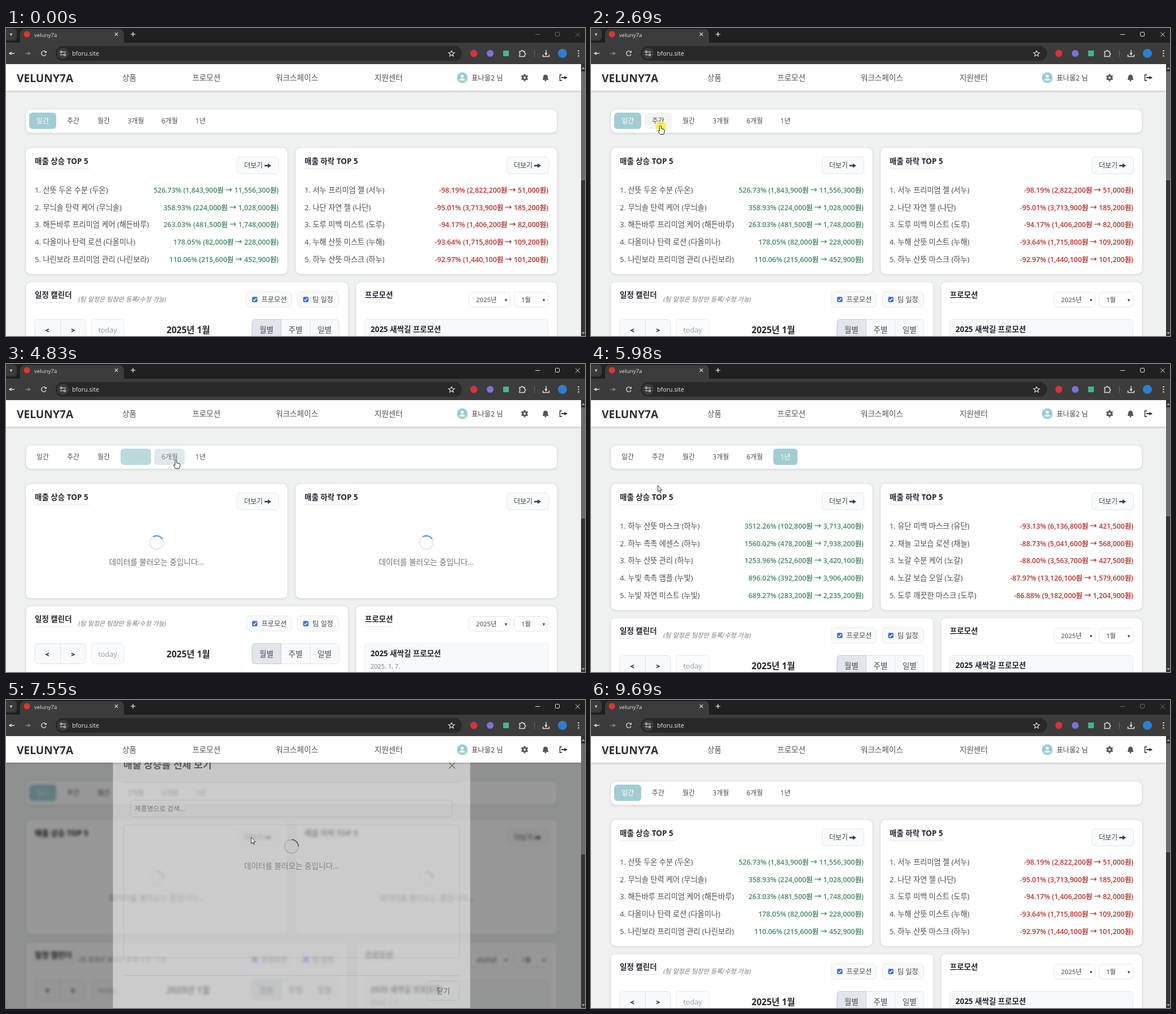
Recreate the animation shown at these times as an HTML page with a canvas. Size 1026 by 546 pixels, loop 9820 ms.

```html
<!DOCTYPE html>
<html lang="ko">
<head>
<meta charset="utf-8">
<title>veluny7a</title>
<style>
html,body{margin:0;width:100%;height:100%;overflow:hidden;background:#eff1f1}
canvas{display:block}
</style>
</head>
<body>
<canvas id="stage" width="1026" height="546"></canvas>
<script>
const cv = document.getElementById('stage');
const main = cv.getContext('2d');
const layer = new OffscreenCanvas(cv.width, cv.height).getContext('2d');
let c = main;
const LOOP = 9820, STEP = 142.9, LOAD = 450, FADE = 250;
const FONT = '"Open Sans","Noto Sans CJK KR","Noto Sans CJK",sans-serif';
const clamp = v => Math.max(0, Math.min(1, v));

// Sales rows: brand|product|before|after, the change is computed
const DAY = {
  up: ['두온|산뜻 # 수분|1843900|11556300', '무늬솔|# 탄력 케어|224000|1028000',
    '해든바루|# 프리미엄 케어|481500|1748000', '다올미나|# 탄력 로션|82000|228000',
    '나린보라|# 프리미엄 관리|215600|452900'],
  down: ['서누|# 프리미엄 젤|2822200|51000', '나단|# 자연 젤|3713900|185200',
    '도루|# 미백 미스트|1406200|82000', '누해|# 산뜻 미스트|1715800|109200',
    '하누|# 산뜻 마스크|1440100|101200']
};
const YEAR = {
  up: ['하누|# 산뜻 마스크|102800|3713400', '하누|# 촉촉 에센스|478200|7938200',
    '하누|# 산뜻 관리|252600|3420100', '누빛|# 촉촉 앰플|392200|3906400',
    '누빛|# 자연 미스트|283200|2235200'],
  down: ['유단|# 미백 마스크|6136800|421500', '채늘|# 고보습 로션|5041600|568000',
    '노갈|# 수분 케어|3563700|427500', '노갈|# 보습 오일|13126100|1579600',
    '도루|# 깨끗한 마스크|9182000|1204900']
};

let tabX = 35;
const TABS = ['일간', '주간', '월간', '3개월', '6개월', '1년'].map(s => {
  const w = 26 + 11 * s.length - (/\d/.test(s) ? 5 : 0), x = tabX + 6;
  tabX = x + w;
  return { s, x, w };
});
const PICKS = [-LOOP, 2720, 3418, 4150, 4788, 5370, 6600]; // each pick takes the next tab
const OPEN = 7418, CLOSE = 9270;
const LOADS = [...PICKS.slice(1), OPEN];
const CLICKS = [...LOADS, CLOSE];

// Pointer moves: leave step, arrive step, x, y
const MOVES = [[0, 1, 983, 470], [1, 4, 976, 412], [5, 13, 477, 203], [13, 18, 123, 173], [21, 25, 190, 169],
  [27, 29, 236, 170], [30, 33, 301, 170], [34, 37, 345, 171], [38, 42, 118, 215], [42, 45, 32, 176],
  [45, 47, 70, 172], [48, 52, 434, 243], [53, 57, 488, 283], [59, 61, 675, 364], [62, 65, 774, 514]];

function pointer(n) {
  if (n < 1 || n > 67) return null;
  let [, , x, y] = MOVES[0];
  for (const [from, to, tx, ty] of MOVES) {
    const p = clamp((n - from) / (to - from)), k = p * p * (3 - 2 * p);
    x += (tx - x) * k;
    y += (ty - y) * k;
  }
  return { x, y };
}
function over(m, x, y, w, h) {
  return m && m.x >= x && m.x <= x + w && m.y >= y && m.y <= y + h;
}

function box(x, y, w, h, r, fill, stroke) {
  c.beginPath();
  c.roundRect(x, y, w, h, r);
  if (fill) { c.fillStyle = fill; c.fill(); }
  if (stroke) { c.strokeStyle = stroke; c.lineWidth = 1; c.stroke(); }
}
function dot(x, y, r, fill) {
  c.beginPath();
  c.arc(x, y, r, 0, 7);
  c.fillStyle = fill;
  c.fill();
}
function arc(x, y, r, from, to, color, width) {
  c.beginPath();
  c.arc(x, y, r, from, to);
  c.strokeStyle = color;
  c.lineWidth = width;
  c.stroke();
}
function text(s, x, y, size, color, weight = 400, align = 'left', style = '') {
  c.font = `${style} ${weight} ${size}px ${FONT}`;
  c.textAlign = align;
  c.fillStyle = color;
  c.fillText(s, x, y);
}
function line(color, width, ...pts) {
  c.beginPath();
  pts.forEach(p => c.lineTo(...p));
  c.strokeStyle = color;
  c.lineWidth = width;
  c.stroke();
}
function draw(path, x, y, fill, stroke, width = 1) {
  c.save();
  c.translate(x, y);
  const p = new Path2D(path);
  if (fill) { c.fillStyle = fill; c.fill(p); }
  if (stroke) { c.strokeStyle = stroke; c.lineWidth = width; c.stroke(p); }
  c.restore();
}
function chevron(x, y, dx, dy, color, width) {
  line(color, width, [x - dx - dy, y - dy - dx], [x + dx, y + dy], [x - dx + dy, y - dy + dx]);
}
function cross(x, y, r, color, width) {
  line(color, width, [x - r, y - r], [x + r, y + r]);
  line(color, width, [x + r, y - r], [x - r, y + r]);
}
function mix(a, b, k) {
  return `rgb(${a.map((v, i) => Math.round(v + (b[i] - v) * k))})`;
}
function card(x, y, w, h) {
  c.save();
  c.shadowColor = 'rgba(0,0,0,.13)';
  c.shadowBlur = 4;
  c.shadowOffsetY = 1;
  box(x, y, w, h, 9, '#fff');
  c.restore();
  box(x, y, w, h, 9, null, '#e2e5e6');
}
function title(s, x, y, end) {
  text(s, x, y, 13.5, '#23272f', 700);
  line('#e0e3e8', 1, [x, y + 8.5], [end, y + 8.5]);
}

function browser(active) {
  const ink = '#ddd', win = active ? '#e6e6e6' : '#6c6c6c';
  c.fillStyle = '#1f2020';
  c.fillRect(0, 0, 1026, 64);
  box(-6, 1, 25, 21, 6, '#3a3b3b');
  chevron(9, 11, 0, 1.6, ink, 1.4);
  c.fillStyle = '#3c3c3c';
  c.fillRect(0, 26, 1026, 38);
  box(25, 2, 184, 28, [8, 8, 0, 0], '#3c3c3c');
  dot(37, 11, 5.5, '#d8382f');
  text('veluny7a', 50, 15.5, 9.7, '#e3e3e3');
  cross(195.5, 11, 2.8, ink, 1.2);
  line(ink, 1.4, [221, 11], [229, 11]);
  line(ink, 1.4, [225, 7], [225, 15]);
  line(win, 1, [938, 11.5], [946, 11.5]);
  box(973.5, 7.5, 7, 7, 1, null, win);
  cross(1013, 11.5, 3.8, win, 1);

  line(ink, 1.4, [15, 45], [6, 45]);
  chevron(8, 45, -2, 0, ink, 1.4);
  line('#858585', 1.4, [34, 45], [43, 45]);
  chevron(41, 45, 2, 0, '#858585', 1.4);
  arc(67, 45, 4.2, 0.4, 5.4, ink, 1.4);
  draw('M5 -5V-1H1Z', 67, 45, ink);

  box(88, 32, 720, 26, 13, '#282828');
  dot(101, 45, 10, '#3b3b3b');
  for (const s of [-1, 1]) {
    line(ink, 1.2, [101, 45 + 2.5 * s], [101 - 5 * s, 45 + 2.5 * s]);
    arc(101 + 3 * s, 45 + 2.5 * s, 1.7, 0, 7, ink, 1.2);
  }
  text('bforu.site', 117, 49, 10.7, '#e8e8e8');
  const star = Array.from({ length: 11 }, (_, i) => {
    const r = i % 2 ? 2.5 : 5.6, a = i * Math.PI / 5;
    return [789.5 + r * Math.sin(a), 45.5 - r * Math.cos(a)];
  });
  line(ink, 1.2, ...star);
  dot(829, 45, 6.3, '#d5323c');
  dot(858, 45, 6, '#7873dd');
  box(881, 40, 10, 10, 0, '#41b883');
  draw('M-5 -3.5H-2A1.7 1.7 0 0 1 1.5 -3.5H4V-.5A1.7 1.7 0 0 1 4 3V5.5H-5V2.5A1.6 1.6 0 0 0 -5 -.5Z', 915, 45, null, ink, 1.4);
  line('#6c6c6c', 1, [936.5, 39], [936.5, 51]);
  line(ink, 1.5, [957, 39], [957, 47]);
  chevron(957, 45.8, 0, 1.8, ink, 1.5);
  line(ink, 1.5, [951.5, 47], [951.5, 50.5], [962.5, 50.5], [962.5, 47]);
  dot(986, 45, 8, '#2f7fce');
  for (const d of [-4.5, 0, 4.5]) dot(1014.5, 45 + d, 1.2, ink);
}

function header() {
  const ink = '#555';
  c.save();
  c.shadowColor = 'rgba(0,0,0,.22)';
  c.shadowBlur = 4;
  c.shadowOffsetY = 1;
  c.fillStyle = '#fff';
  c.fillRect(0, 64, 1019, 47);
  c.restore();
  text('VELUNY7A', 19, 95.5, 19.2, '#2e2e2e', 700);
  [['상품', 206], ['프로모션', 330], ['워크스페이스', 478], ['지원센터', 653]].forEach(([s, x]) => text(s, x, 93, 13.6, ink));
  dot(808.5, 88, 9.5, '#9ccbd1');
  dot(808.5, 85.5, 2.7, '#fff');
  draw('M-5 5Q-5 1.5 0 1.5T5 5Z', 808.5, 88, '#fff');
  text('표나울2 님', 825, 92.5, 12.3, '#444');

  for (let i = 0; i < 6; i++) {
    const a = (i + .5) * Math.PI / 3;
    line(ink, 3, [919, 88], [919 + Math.cos(a) * 6.3, 88 + Math.sin(a) * 6.3]);
  }
  dot(919, 88, 4.6, ink);
  dot(919, 88, 2, '#fff');
  draw('M-5.5 4Q-4 2 -4 -1Q-4 -5 0 -5.5Q4 -5 4 -1Q4 2 5.5 4Z', 956, 88, ink);
  dot(956, 93, 1.6, ink);
  line(ink, 1.8, [985, 83], [981.5, 83], [981.5, 93], [985, 93]);
  line('#333', 2, [984, 88], [993, 88]);
  chevron(991.2, 88, 1.8, 0, '#333', 2);
}

function scrollbar(loading) {
  c.fillStyle = '#333434';
  c.fillRect(1019, 64, 7, 482);
  box(1019, 77, 7, loading ? 197 : 193, 0, '#696a6a');
  draw('M-3 2H3L0 -2Z', 1023, 71, '#999');
  draw('M-3 -2H3L0 2Z', 1023, 541, '#999');
}

function tabs(T, mouse) {
  const k = PICKS.findLastIndex(t => t <= T), now = k % 6;
  const p = clamp((T - PICKS[k]) / 150);
  card(35, 144, 941.5, 42);
  TABS.forEach(({ s, x, w }, i) => {
    const on = i === now ? p : i === k - 1 ? 1 - p : 0;
    if (over(mouse, x, 150, w, 29)) box(x, 150, w, 29, 6, '#f3f4f5');
    c.globalAlpha = on;
    box(x, 150, w, 29, 6, '#a1cdd2');
    c.globalAlpha = 1;
    text(s, x + w / 2, 168.5, 12, mix([75, 78, 82], [250, 253, 253], on), 400, 'center');
  });
  return now;
}

function spinner(x, y, age, color, ring) {
  const a = age / 1000 * Math.PI * 2 - Math.PI * .75;
  arc(x, y, 12, 0, 7, ring, 2);
  arc(x, y, 12, a, a + Math.PI / 2, color, 2);
  text('데이터를 불러오는 중입니다...', x, y + 39.5, 13.6, '#6e7175', 400, 'center');
}

function rows(list, left, right, top, gap, color) {
  const won = v => (+v).toLocaleString('en-US') + '원';
  list.forEach((row, i) => {
    const [brand, name, from, to] = row.split('|'), y = top + gap * i;
    const pct = ((to / from - 1) * 100).toFixed(2);
    text(`${i + 1}. ${name.replace('#', brand)} (${brand})`, left, y, 13.2, '#4a4d52');
    text(`${pct}% (${won(from)} → ${won(to)})`, right, y, 12.4, color, 600, 'right');
  });
}

function sales(x, name, list, color, age, mouse) {
  card(x, 212, 464, age < LOAD ? 203.5 : 224.5);
  title(name, x + 16, 241, x + 112);
  box(x + 374.5, 228.5, 74, 30, 5, over(mouse, x + 374, 228, 74, 30) ? '#f1f3f5' : '#f9fafb', '#e3e7eb');
  text('더보기', x + 387, 248, 12, '#444');
  line('#3c3f44', 2.6, [x + 423, 244], [x + 432, 244]);
  draw('M-4 -4L2 0L-4 4Z', x + 433, 244, '#3c3f44');
  if (age < LOAD) spinner(x + 231.8, 316.5, age, '#4e84e6', '#e4e6ea');
  else rows(list, x + 16, x + 448, 292, 30.7, color);
}

function planner() {
  const edge = '#dfe3e8', pale = '#f8f9fb';
  card(35, 450, 571.5, 140);
  title('일정 캘린더', 51, 478, 118);
  text('(팀 일정은 팀장만 등록/수정 가능)', 128, 485, 11.2, '#777', 400, 'left', 'italic');
  [['프로모션', 426, 80], ['팀 일정', 516.5, 73]].forEach(([s, x, w]) => {
    box(x, 467.5, w, 27, 6, '#f9fafb', '#e5e8ec');
    box(x + 10, 476.5, 9.5, 9.5, 2, '#3f70dd');
    line('#fff', 1.4, [x + 12, 481.5], [x + 14, 483.5], [x + 17.5, 479]);
    text(s, x + 26.5, 485.5, 12.2, '#4b4e53');
  });

  box(51, 516.5, 90, 36, 6, pale, edge);
  line(edge, 1, [96.5, 517], [96.5, 552]);
  chevron(73.5, 536, -2.5, 0, '#3a3d42', 1.8);
  chevron(118.5, 536, 2.5, 0, '#3a3d42', 1.8);
  box(151, 516.5, 58, 36, 6, '#fafbfc', '#e8ebee');
  text('today', 180, 540, 12.6, '#989ba0', 400, 'center');
  text('2025년 1월', 323, 541, 15.5, '#24272c', 700, 'center');
  box(436, 516.5, 154, 36, 6, pale, edge);
  box(436, 516.5, 51.5, 36, [6, 0, 0, 6], '#e1e5ec', '#c4ccd7');
  line(edge, 1, [539, 517], [539, 552]);
  ['월별', '주별', '일별'].forEach((s, i) => text(s, 461.5 + 51.5 * i, 540, 13.6, '#4b4e53', 400, 'center'));

  card(620, 450, 356.5, 140);
  title('프로모션', 636, 478, 686);
  [['2025년', 820.5, 73], ['1월', 900.5, 60]].forEach(([s, x, w]) => {
    box(x, 468.5, w, 26, 5, '#fff', edge);
    text(s, x + 12.5, 486, 11.4, '#444');
    chevron(x + w - 7.5, 482, 0, 1.5, '#333', 1.5);
  });
  box(636, 516.5, 324.5, 70, 5, '#f8f9fa', '#e6e9ed');
  text('2025 새싹길 프로모션', 646, 538.5, 13.5, '#23272f', 700);
  text('2025. 1. 7.', 646, 560.5, 11, '#777');
}

function dialog(age) {
  const edge = '#dcdfe3';
  box(189.5, 85, 633, 480, 6, '#fff');
  text('매출 상승률 전체 보기', 208, 121, 17.3, '#23272f', 700);
  cross(790.5, 116, 5.5, '#444', 1.3);
  line(edge, 1, [208, 146], [803, 146]);
  box(220.5, 177.5, 570, 30, 5, null, edge);
  text('제품명으로 검색...', 228, 196.5, 11.9, '#666');
  box(208.5, 221, 595, 236, 5, null, edge);
  if (age < LOAD) spinner(506, 259.5, age, '#333', '#ccc');
  else rows(DAY.up, 224, 788, 251, 44, '#448a63');
  line(edge, 1, [208, 488.5], [803, 488.5]);
  box(746.5, 498.5, 57, 34, 5, null, edge);
  text('닫기', 775, 520, 12.8, '#444', 400, 'center');
}

// Blurs and dims the page, then lays the dialog over it as one sheet
function modal(age, k) {
  const dim = Math.min(1, k * 1.6), area = [0, 111, 1019, 435];
  c = layer;
  c.clearRect(0, 0, cv.width, cv.height);
  dialog(age);
  c = main;
  c.save();
  c.beginPath();
  c.rect(...area);
  c.clip();
  c.filter = `blur(${3 * dim}px)`;
  c.drawImage(cv, ...area, ...area);
  c.filter = 'none';
  c.fillStyle = `rgba(0,0,0,${.5 * dim})`;
  c.fillRect(...area);
  c.globalAlpha = k;
  c.drawImage(layer.canvas, 0, 0);
  c.restore();
}

function cursor(m, hand, halo) {
  if (halo) dot(m.x + .8, m.y + 1.5, 9.5, 'rgba(248,238,40,.72)');
  if (hand) draw('M-1.5 1.2Q0 -1 1.5 1.2V5.5L6 6.4Q7.5 7 7.5 8.6L7 12L5.5 15.5H-.5L-4 10.3Q-4.3 8 -1.5 9.5Z', m.x, m.y, '#fff', '#222');
  else draw('M.5 .5V11.5L3 9.3L4.7 13L6.2 12.3L4.6 8.7L8 8.5Z', m.x, m.y, '#fff', '#333');
}

function paint(n) {
  const T = n * STEP - 30;
  const mouse = pointer(n);
  const age = T - (LOADS.findLast(t => t <= T) ?? -LOOP);
  const loading = age < LOAD;
  const k = clamp((T - OPEN) / FADE) * (1 - clamp((T - CLOSE) / FADE));
  const free = k ? null : mouse;

  c.fillStyle = T > CLOSE ? '#f0f0f0' : '#eff1f1';
  c.fillRect(0, 0, 1026, 546);
  const data = tabs(T, free) > 2 ? YEAR : DAY;
  sales(35, '매출 상승 TOP 5', data.up, '#448a63', age, free);
  sales(513, '매출 하락 TOP 5', data.down, '#b8332d', age, free);
  c.save();
  if (loading) c.translate(0, -21);
  planner();
  c.restore();
  if (k) modal(T - OPEN, k);
  header();
  scrollbar(loading);
  browser(n >= 18 && n < 68);

  if (mouse) {
    const hand = k ? over(mouse, 746, 499, 57, 34)
      : TABS.some(t => over(mouse, t.x, 150, t.w, 29)) || over(mouse, 409, 229, 74, 30);
    cursor(mouse, hand, CLICKS.some(t => t >= T && t - T < STEP));
  }
}

// The screen advances in even steps
let last = -1;
function tick() {
  const n = Math.floor((performance.now() % LOOP + 30) / STEP);
  if (n !== last) paint(last = n);
  requestAnimationFrame(tick);
}
tick();
</script>
</body>
</html>
```
